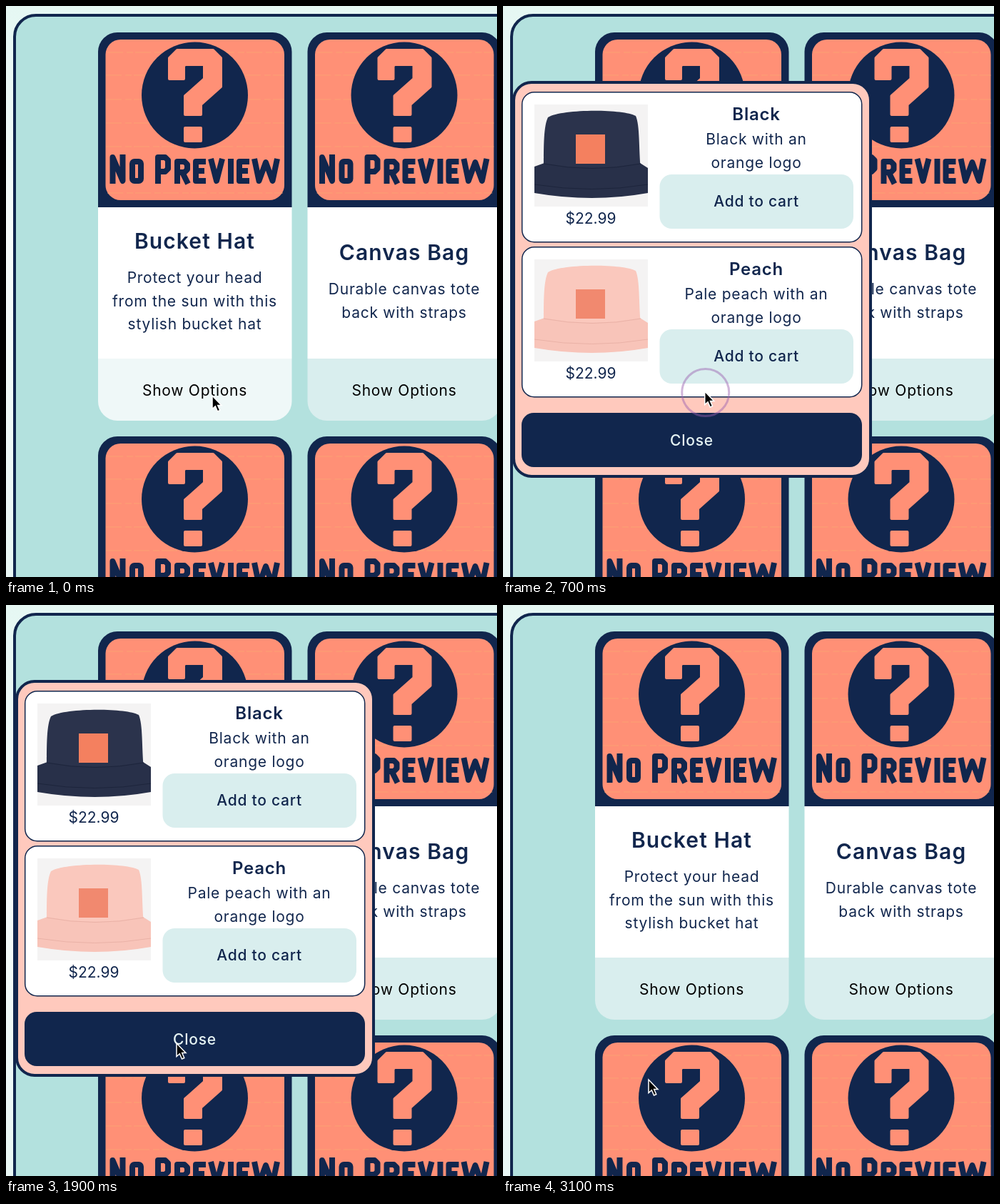
Write an HTML page that moves like this. It is 688 by 800 pixels and loops after 3200 ms.

```html
<!DOCTYPE html>
<html lang="en">
<head>
<meta charset="utf-8">
<title>Product options</title>
<style>
  html, body { margin: 0; width: 100%; height: 100%; overflow: hidden; }
  svg { display: block; width: 688px; height: 800px; }
  text { font: 21px Inter, "Open Sans", sans-serif; letter-spacing: .75px; text-anchor: middle; fill: #11264d; }
  .name { font-size: 30px; font-weight: 600; letter-spacing: 1.1px; }
  .variant { font-size: 24px; font-weight: 600; }
  .button { font-weight: 500; }
  .price { letter-spacing: 0; }
  .option { fill: #000; }
  .close { fill: #e6f4f4; font-weight: 500; }
</style>
</head>
<body>
<svg viewBox="0 0 688 800">
  <defs>
    <linearGradient id="page" x2="0" y2="1">
      <stop stop-color="#e5f7f3"/>
      <stop offset=".4" stop-color="#f7fcfb"/>
      <stop offset="1" stop-color="#e9f7f5"/>
    </linearGradient>
    <clipPath id="photo"><rect x="44" y="138" width="159" height="143"/></clipPath>
    <g id="preview">
      <path d="M129 282V64a27 27 0 0 1 27-27H373.500a27 27 0 0 1 27 27V282Z" fill="#11264d"/>
      <rect x="139.500" y="47" width="250.500" height="225" rx="21" fill="#ff9076"/>
      <path d="M142 65H388M140 97H390M140 131H390M140 164H390M140 197H390M142 262H388"
        stroke="#f9a873" stroke-dasharray="22 5 9 3" opacity=".7"/>
      <circle cx="264.500" cy="125" r="74.500" fill="#11264d"/>
      <path d="M229 102V73L240 62H290L301 73V113L273 138V152H251V126L278 102V82H251L249 84V102Z
        M251 171H273V189H251Z" fill="#ff9076" stroke="#ff9076" stroke-width="4" stroke-linejoin="round"/>
      <g id="lettering" role="img" aria-label="No Preview" fill="none" stroke="#11264d" stroke-width="8" stroke-linejoin="round">
        <path d="M149.500 249V212L163.500 245V208"/>
        <rect x="177" y="218" width="12" height="27" rx="3"/>
        <path d="M213 249V212H223L227 216V228L223 232H213"/>
        <path d="M240 249V218H250L254 222V229L250 233H240M247 233L255 249"/>
        <path d="M280 218H266V245H280M266 231H278"/>
        <path d="M287 214L295 245L303 214"/>
        <path d="M315 214V249"/>
        <path d="M341 218H327V245H341M327 231H339"/>
        <path d="M348 214L354.500 245L364 219L373.500 245L380 214"/>
      </g>
    </g>
  </defs>

  <rect width="688" height="800" fill="url(#page)"/>
  <rect x="12" y="13" width="800" height="900" rx="30" fill="#b3e1de" stroke="#11264d" stroke-width="4"/>
  <g id="cards"></g>

  <g id="modal">
    <rect x="15" y="107" width="500" height="552" rx="25" fill="#ffc9bd" stroke="#11264d" stroke-width="4"/>
    <g id="variants"></g>
    <rect x="26" y="570" width="477" height="76" rx="17" fill="#11264d"/>
    <text class="close" x="264.500" y="616">Close</text>
  </g>

  <circle id="ripple" fill="none" stroke="#9a5fae"/>
  <path id="cursor" d="M0 0V18.500L4.300 14.700L7.500 22L10.800 20.500L7.700 13.500H13Z" stroke="#fff" stroke-width="1.500"/>
</svg>
<script>
const LOOP = 3200, STEP = 100;
const MODAL_OPEN = 700, MODAL_CLOSE = 2600;
const $ = id => document.getElementById(id);
const lerp = (a, b, k) => a + (b - a) * k;

const text = (cls, x, y, str) => `<text class="${cls}" x="${x}" y="${y}">${str}</text>`;
const lines = (x, y, list) => list.map((s, i) => text('', x, y + i * 32.7, s)).join('');

const card = (dx, nameY, name, about) => `<g transform="translate(${dx})">
  <use href="#preview"/><use href="#preview" y="566"/>
  <path d="M129 282H400.500V494H129Z" fill="#fff"/>
  <path class="footer" d="M129 494H400.500V554a27 27 0 0 1-27 27H156a27 27 0 0 1-27-27Z" fill="#d9eeee"/>
  ${text('name', 264.5, nameY, name)}${lines(264.5, nameY + 48, about)}
  ${text('option', 264.5, 546, 'Show Options')}</g>`;

const variant = (dy, name, about, [crown, brim, crease, badge]) => `<g transform="translate(0 ${dy})">
  <rect x="26.700" y="120.700" width="476" height="210" rx="17" fill="#fff" stroke="#11264d" stroke-width="1.500"/>
  <rect x="44" y="138" width="159" height="143" fill="#f4f3f3"/>
  <g clip-path="url(#photo)">
    <path d="M57 230C57 195 57 168 63 156C82 144 168 144 186 154C192 168 190 198 193 230Z" fill="${crown}"/>
    <path d="M44 225L58 220Q125 233 192 220L203 227V262Q125 276 44 262Z" fill="${brim}"/>
    <path d="M57 221Q125 234 193 221M44 250Q125 263 203 250" fill="none" stroke="${crease}"/>
    <rect x="102" y="180" width="41" height="41" fill="${badge}"/>
  </g>
  <rect x="219.500" y="236" width="271.500" height="76" rx="17" fill="#d9eeee"/>
  ${text('variant', 355, 160, name)}${lines(355, 194, about)}
  ${text('button', 355, 281, 'Add to cart')}${text('price', 123, 305, '$22.99')}</g>`;

$('cards').innerHTML =
  card(0, 340, 'Bucket Hat', ['Protect your head', 'from the sun with this', 'stylish bucket hat']) +
  card(293.5, 356, 'Canvas Bag', ['Durable canvas tote', 'back with straps']);
$('variants').innerHTML =
  variant(0, 'Black', ['Black with an', 'orange logo'], ['#2b334c', '#283049', '#1d253c', '#f4805f']) +
  variant(217, 'Peach', ['Pale peach with an', 'orange logo'], ['#fac8bd', '#f8c4b9', '#eab2a7', '#f1896f']);

// Cursor tip: time, x, y
const route = [[0, 289, 546], [300, 284, 541], [600, 283, 540], [900, 282, 540], [1300, 241, 583],
  [1600, 239, 613], [1900, 239, 614], [2500, 238, 611], [2700, 238, 612], [3100, 204, 665], [3200, 204, 665]];

function cursorAt(t) {
  const i = Math.max(1, route.findIndex(p => p[0] >= t));
  const [t0, x0, y0] = route[i - 1], [t1, x1, y1] = route[i];
  let k = (t - t0) / (t1 - t0);
  k = k * k * (3 - 2 * k);
  return [lerp(x0, x1, k), lerp(y0, y1, k)];
}

function drawRipple(t, [x, y]) {
  const start = t < 1600 ? 600 : 2500;
  const k = (t - start) / 200;
  const visible = k >= 0 && k < 2;
  $('ripple').style.display = visible ? '' : 'none';
  if (!visible) return;
  const attrs = {
    cx: x + 1, cy: y + 1.5, r: lerp(26.5, 39.5, k),
    'stroke-width': Math.max(1, lerp(4, 2, k)),
    opacity: k <= 1 ? lerp(.32, .6, k) : lerp(.6, 0, k - 1)
  };
  for (const name in attrs) $('ripple').setAttribute(name, attrs[name]);
}

const footer = document.querySelector('.footer');

function frame(now) {
  const t = Math.floor(now % LOOP / STEP) * STEP;
  const point = cursorAt(t);
  const hover = t < MODAL_OPEN ? Math.min(1, .58 + t / 300) : 0;
  $('modal').style.display = t >= MODAL_OPEN && t < MODAL_CLOSE ? '' : 'none';
  footer.setAttribute('fill', `rgb(${lerp(217, 255, hover)} ${lerp(238, 255, hover)} ${lerp(238, 255, hover)})`);
  $('cursor').setAttribute('transform', `translate(${point})`);
  drawRipple(t, point);
  requestAnimationFrame(frame);
}
const origin = performance.now();
requestAnimationFrame(function start(now) { frame(Math.max(0, now)); });
</script>
</body>
</html>
```
